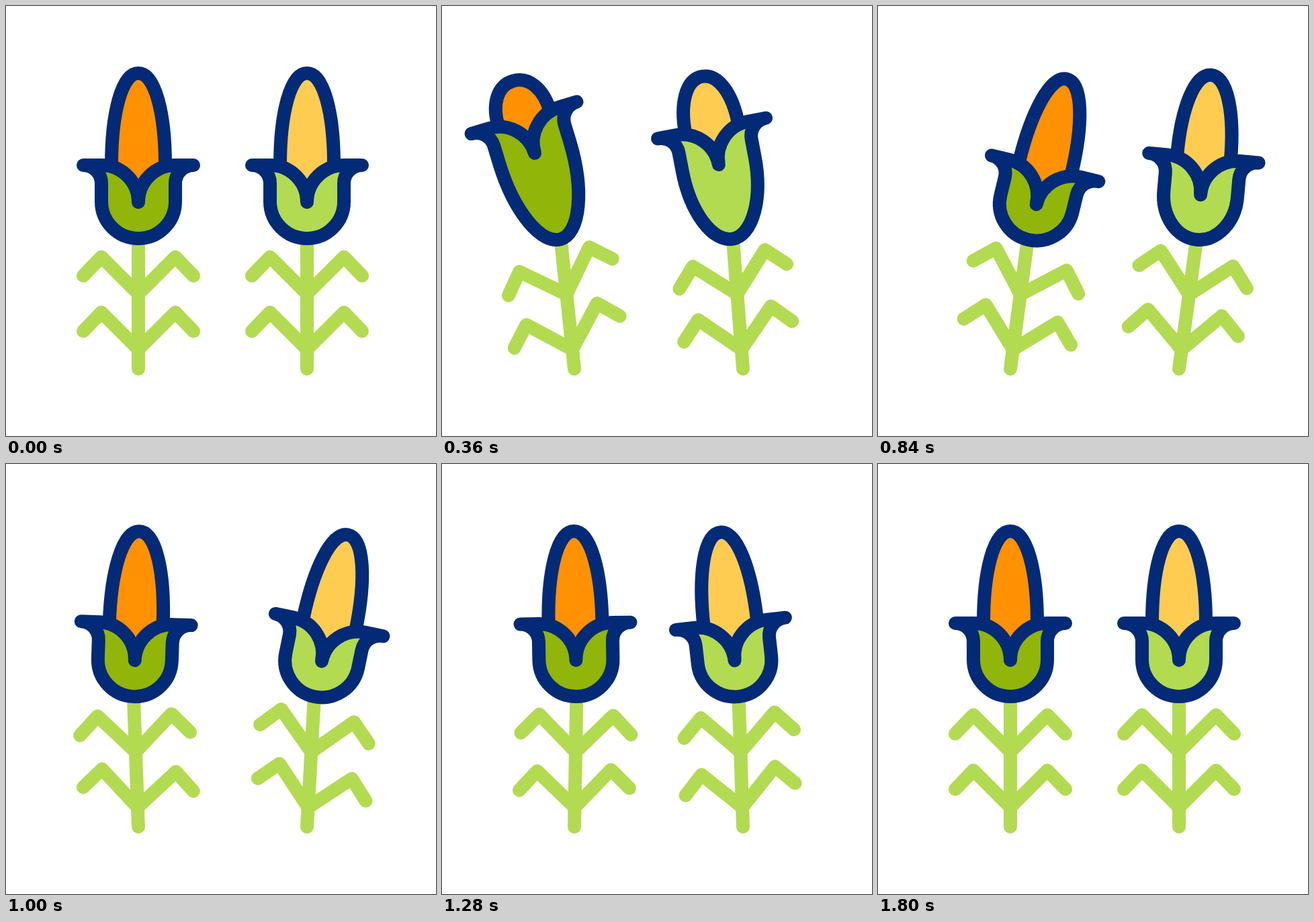
An HTML page with a canvas that plays this animation: 640 by 640 pixels, repeating every 2400 ms.

```html
<!DOCTYPE html>
<html lang="en">
<head>
<meta charset="utf-8">
<title>Swaying corn</title>
<style>
  html, body { margin: 0; width: 100%; height: 100%; overflow: hidden; background: #fff; }
  canvas { display: block; width: 640px; height: 640px; }
</style>
</head>
<body>
<canvas id="stage" width="640" height="640"></canvas>
<script>
const ctx = document.getElementById('stage').getContext('2d');
const LOOP = 2400, STEP = 20, LAG = 80;
const NAVY = '#032a76', LEAF = '#b2db51';
const PLANTS = [
  { x: 197, delay: 0, cob: '#ff9102', husk: '#91b508' },
  { x: 448, delay: LAG, cob: '#ffcc52', husk: LEAF }
];

// Keys are [ms, value]; angles in degrees.
const STEM = [[0, 0], [472, -7], [800, 8.4], [1080, -4.7], [1360, 2.4], [1720, 0]];
const HEAD = [[88, 0], [582, -18.8], [902, 8.7], [1155, -5], [1430, 2], [1720, 0]];
const UPPER = [[60, 0], [540, -19.5], [843, 9.7], [1100, -4.3], [1380, 1.7], [1720, 0]];
const CLOSE = [[0, 0], [492, 97], [840, 0]];

function track(keys, t) {
  if (t <= keys[0][0]) return keys[0][1];
  for (let i = 1; i < keys.length; i++) {
    const [t0, a] = keys[i - 1], [t1, b] = keys[i];
    if (t < t1) {
      const p = (t - t0) / (t1 - t0);
      return a + (b - a) * p * p * (3 - 2 * p);
    }
  }
  return keys[keys.length - 1][1];
}

// Draws inside a frame moved up the stem by `up` and turned by `deg`.
function turned(up, deg, draw) {
  ctx.save();
  ctx.translate(0, -up);
  ctx.rotate(deg * Math.PI / 180);
  draw();
  ctx.restore();
}

function line(...pts) {
  ctx.beginPath();
  pts.forEach(([x, y]) => ctx.lineTo(x, y));
  ctx.stroke();
}

function leaves() {
  line([-82, -27], [-55, -55], [0, 0], [55, -55], [82, -27]);
}

function paint(fill) {
  ctx.fillStyle = fill;
  ctx.fill();
  ctx.stroke();
}

// The cob shortens from below, so its sides always meet the rim.
function cob(fill, rim) {
  const top = -246, bend = rim + (top - rim) * 0.56;
  ctx.beginPath();
  ctx.moveTo(-40, rim + 19);
  ctx.lineTo(-40, rim);
  ctx.bezierCurveTo(-40, bend, -25, top, 0, top);
  ctx.bezierCurveTo(25, top, 40, bend, 40, rim);
  ctx.lineTo(40, rim + 19);
  paint(fill);
}

// The rim slides up while the bottom stays put.
function husk(fill, rim) {
  const q = Math.PI / 2, waist = rim + 54;
  ctx.beginPath();
  ctx.moveTo(-82, rim);
  ctx.lineTo(-55, rim);
  ctx.arc(-55, rim + 55, 55, -q, 0);
  ctx.arc(55, rim + 55, 55, 2 * q, 3 * q);
  ctx.lineTo(82, rim);
  ctx.arc(82, rim + 27, 27, -q, -2 * q, true);
  ctx.ellipse(0, waist, 55, -waist, 0, 0, 2 * q);
  ctx.arc(-82, rim + 27, 27, 0, -q, true);
  ctx.closePath();
  paint(fill);
}

function plant(p, time) {
  const t = time - p.delay;
  const bend = track(HEAD, t);
  const rim = -109 - track(CLOSE, t);
  ctx.save();
  ctx.translate(p.x, 540);
  turned(0, track(STEM, t), () => {
    ctx.strokeStyle = LEAF;
    line([0, 0], [0, -190]);
    turned(29, bend, leaves);
    turned(111.5, track(UPPER, t), leaves);
    ctx.strokeStyle = NAVY;
    turned(194, bend, () => {
      cob(p.cob, rim);
      husk(p.husk, rim);
    });
  });
  ctx.restore();
}

function frame(now) {
  const time = Math.floor((now % LOOP) / STEP) * STEP;
  ctx.fillStyle = '#fff';
  ctx.fillRect(0, 0, 640, 640);
  ctx.lineWidth = 20;
  ctx.lineCap = ctx.lineJoin = 'round';
  PLANTS.forEach(p => plant(p, time));
}

let start;
function tick(now) {
  if (start === undefined) start = now;
  frame(Math.max(0, now - start));
  requestAnimationFrame(tick);
}
frame(0);
requestAnimationFrame(tick);
</script>
</body>
</html>
```
